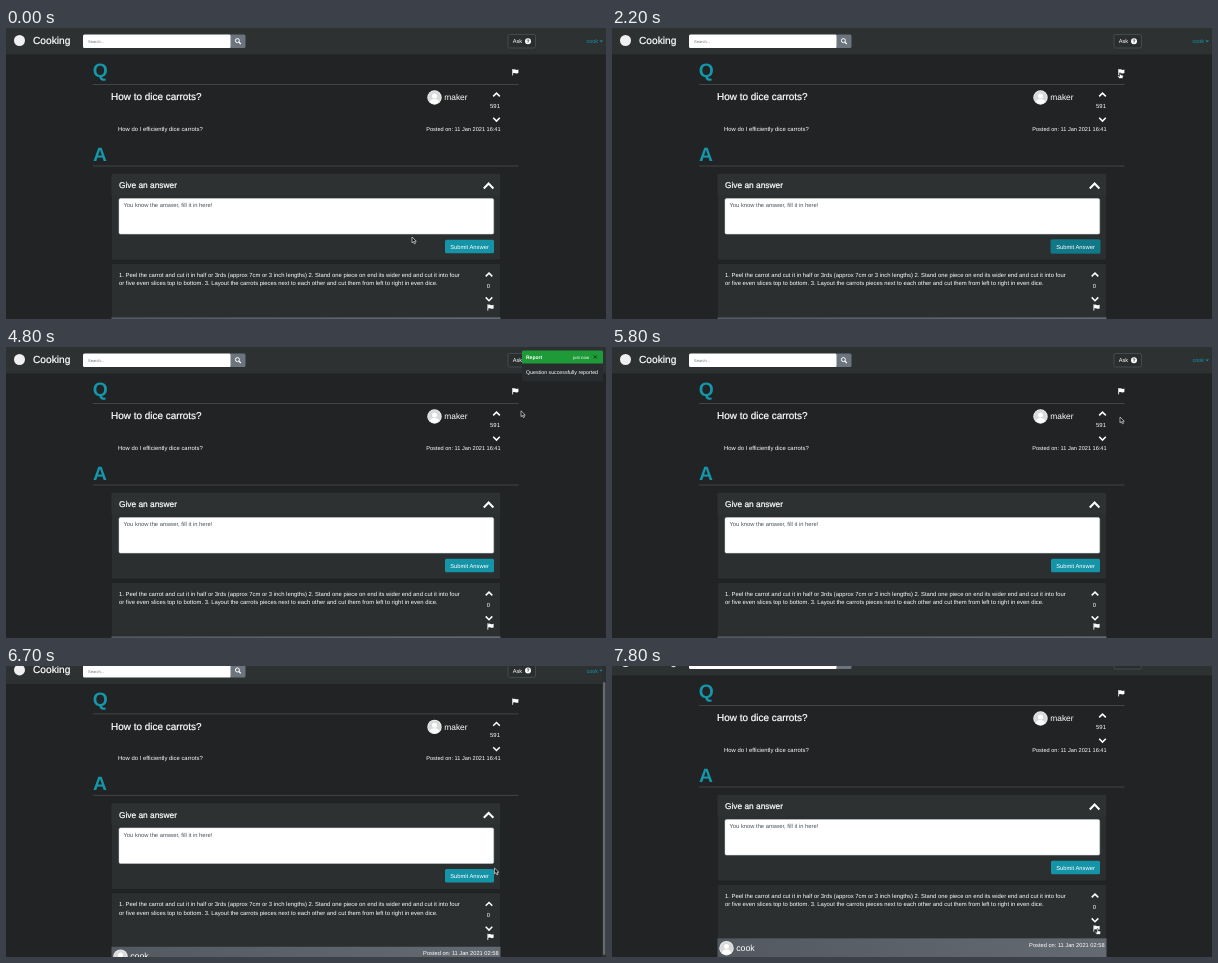
These frames come from a looping animation (600x291 px, 8000 ms). An HTML page:

```html
<!DOCTYPE html>
<html lang="en">
<head>
<meta charset="utf-8">
<title>Cooking</title>
<style>
html, body { margin: 0; width: 100%; height: 100%; overflow: hidden; background: #212324; }
svg { display: block; width: 100%; height: 100%; }
text { font-family: "Liberation Sans", Arial, sans-serif; fill: #fff; text-rendering: geometricPrecision; }
.medium { stroke: #fff; stroke-width: .22; }
.teal { fill: #1596a9; }
.hr { stroke: #4b4e4f; stroke-width: .8; }
.chevron { fill: none; stroke: #fff; stroke-width: 1.5; }
.card { fill: #2b2f30; stroke: #1d1f20; stroke-width: .5; }
</style>
</head>
<body>
<svg viewBox="0 0 600 291">
  <defs>
    <linearGradient id="barFill">
      <stop offset="0" stop-color="#535960"/>
      <stop offset="1" stop-color="#646a72"/>
    </linearGradient>
    <g id="flag">
      <path d="M.4 0V6.4" stroke="#fff" stroke-width=".8"/>
      <path d="M.7 .5Q2 0 3.3 .6T6.2 .5V4.1Q4.7 4.8 3.3 4.2T.7 4.3Z" fill="#fff"/>
    </g>
    <g id="avatar">
      <circle r="7.2" fill="#f4f4f4"/>
      <circle r="6.5" fill="#d9d9d9"/>
      <circle cy="-1.6" r="2.5" fill="#fff"/>
      <path d="M-4.6 4.6Q-4.2 1.4 0 1.4T4.6 4.6Q2.6 6.5 0 6.5T-4.6 4.6Z" fill="#fff"/>
    </g>
    <path id="up" class="chevron" d="M-3.3 1.8L0 -1.5L3.3 1.8"/>
    <path id="down" class="chevron" d="M-3.3 -1.8L0 1.5L3.3 -1.8"/>
  </defs>

  <g id="page">
    <rect y="-5" width="600" height="31.5" fill="#2d3132"/>
    <circle cx="13.5" cy="12.5" r="5.5" fill="#f0f0f0"/>
    <text class="medium" x="27" y="16" font-size="10.2">Cooking</text>
    <rect x="77" y="6.5" width="148" height="13.5" rx="1.5" fill="#fff"/>
    <text x="82" y="15.2" font-size="4" style="fill:#6c757d">Search...</text>
    <path d="M224.5 6.5H238Q239.5 6.5 239.5 8V18.5Q239.5 20 238 20H224.5Z" fill="#6c757d"/>
    <g fill="none" stroke="#fff" stroke-width="1">
      <circle cx="231.4" cy="12.6" r="2"/>
      <path d="M232.9 14.1L234.8 16" stroke-width="1.3"/>
    </g>
    <rect x="502" y="6.5" width="27.5" height="13.5" rx="1.5" fill="#2a2e2f" stroke="#50565a" stroke-width=".7"/>
    <text x="506.7" y="15.3" font-size="5.7">Ask</text>
    <circle cx="522" cy="13.2" r="3" fill="#fff"/>
    <text x="522" y="15.1" font-size="5" font-weight="bold" text-anchor="middle" style="fill:#2a2e2f">?</text>
    <text class="teal" x="580.5" y="15.3" font-size="5.5">cook</text>
    <path class="teal" d="M593.4 12.4H597L595.2 14.2Z"/>

    <text class="teal" x="86.8" y="48.7" font-size="19.3" font-weight="bold">Q</text>
    <use href="#flag" x="506.2" y="41"/>
    <path class="hr" d="M87 56.5H512.5M87 138H512.5"/>
    <text class="medium" x="105" y="72.2" font-size="9.95">How to dice carrots?</text>
    <use href="#avatar" x="428.5" y="69.5"/>
    <text x="438.3" y="72.3" font-size="8.4">maker</text>
    <use href="#up" x="490.5" y="66.6"/>
    <text x="489" y="80" font-size="5.9" text-anchor="middle">591</text>
    <use href="#down" x="490.5" y="91.6"/>
    <text x="112" y="102.8" font-size="5.9">How do I efficiently dice carrots?</text>
    <text x="494.6" y="102.8" font-size="5.62" text-anchor="end">Posted on: 11 Jan 2021 16:41</text>
    <text class="teal" x="87" y="132.8" font-size="19.3" font-weight="bold">A</text>

    <rect class="card" x="105.3" y="145.5" width="389.2" height="86.5"/>
    <rect x="105.5" y="145.8" width="388.8" height="21.7" fill="#2d3132"/>
    <text class="medium" x="113" y="160.3" font-size="8.35">Give an answer</text>
    <path class="chevron" d="M477.8 160.4L482.6 155.6L487.4 160.4" style="stroke-width:2.1"/>
    <rect x="113" y="170.5" width="374.7" height="35.6" rx="1.5" fill="#fff" stroke="#ced4da" stroke-width=".5"/>
    <text x="117.5" y="179.2" font-size="5.8" style="fill:#495057">You know the answer, fill it in here!</text>
    <rect id="ring" x="438.2" y="210.9" width="50.6" height="15.2" rx="2" fill="#1b5a65"/>
    <rect id="submit" x="439" y="211.7" width="49" height="13.5" rx="1.5"/>
    <text x="463.5" y="220.5" font-size="5.8" text-anchor="middle">Submit Answer</text>

    <rect class="card" x="105.3" y="235.5" width="389.2" height="54"/>
    <text x="113" y="248.8" font-size="5.86">1. Peel the carrot and cut it in half or 3rds (approx 7cm or 3 inch lengths) 2. Stand one piece on end its wider end and cut it into four</text>
    <text x="113" y="257.3" font-size="5.86">or five even slices top to bottom. 3. Layout the carrots pieces next to each other and cut them from left to right in even dice.</text>
    <use href="#up" x="483" y="246.6"/>
    <text x="482.4" y="260" font-size="5.9" text-anchor="middle">0</text>
    <use href="#down" x="483" y="271.2"/>
    <use href="#flag" x="481.4" y="276.3"/>
    <rect x="105.5" y="289.3" width="389" height="18.7" fill="url(#barFill)"/>
    <use href="#avatar" x="114.5" y="299.2"/>
    <text x="124.2" y="302" font-size="8.8">cook</text>
    <text x="492.6" y="297.8" font-size="5.7" text-anchor="end">Posted on: 11 Jan 2021 02:58</text>
  </g>

  <g id="scrollbar">
    <rect x="596" width="4" height="291" fill="#2b2e2f"/>
    <rect x="597" y="16" width="2.4" height="273" rx="1.2" fill="#66696a"/>
  </g>

  <g id="toast">
    <rect x="516" y="3.5" width="81" height="31" rx="1.5" fill="#292c2e"/>
    <path d="M516 16.5V5Q516 3.5 517.5 3.5H595.5Q597 3.5 597 5V16.5Z" fill="#1f9a38"/>
    <text x="520" y="11.8" font-size="5" font-weight="bold">Report</text>
    <text x="567" y="11.6" font-size="4.4">just now</text>
    <path d="M587.8 8.4L590.8 11.4M590.8 8.4L587.8 11.4" stroke="#10351a" stroke-width=".9"/>
    <text x="520" y="26.8" font-size="5.27">Question successfully reported</text>
  </g>

  <path id="arrow" d="M0 0V5.8L1.4 4.6L2.4 6.8L3.5 6.3L2.5 4.2H4.3Z" fill="#111" stroke="#fff" stroke-width=".6"/>
  <path id="hand" d="M-.6 .4Q0 -.4 .6 .4V2.2L2.8 2.7Q3.4 3 3.2 4L2.6 6H-.8L-2.4 3.7Q-2.2 2.9 -1.4 3.3L-.6 3.9Z" fill="#fff" stroke="#222" stroke-width=".6"/>
</svg>
<script>
const LOOP = 8000, STEP = 100;
const $ = id => document.getElementById(id);

// Keys are [time, ...values], joined by straight lines.
const cursor = [
  [0, 406, 209], [100, 406, 209], [200, 496.5, 72], [300, 496.5, 72], [800, 508, 44.5],
  [2800, 508, 44.5], [3400, 517, 66], [3900, 517, 66], [4100, 516.5, 65], [4400, 516.5, 65],
  [4800, 515, 63.8], [5400, 515, 63.8], [5800, 508, 70], [6200, 486, 148],
  [6600, 488.5, 202], [7100, 488.5, 202], [7600, 485.5, 262.5]
];
const scroll = [[6300, 0], [6400, 1], [6600, 5.5], [7000, 18], [7100, 18], [7400, 17]];
const toast = [[2300, 0], [2600, 1], [5400, 1], [5600, 0]];
const focus = [[900, 0], [1100, 1], [2400, 1], [2600, 0]];

function at(keys, t) {
  if (t <= keys[0][0]) return keys[0].slice(1);
  const i = keys.findIndex(k => k[0] > t);
  if (i < 0) return keys[keys.length - 1].slice(1);
  const a = keys[i - 1], b = keys[i], p = (t - a[0]) / (b[0] - a[0]);
  return a.slice(1).map((v, n) => v + (b[n + 1] - v) * p);
}

const mix = (a, b, p) => `rgb(${a.map((v, i) => Math.round(v + (b[i] - v) * p))})`;
const show = (el, on) => el.setAttribute("opacity", +on);

function draw(time) {
  const t = Math.floor(time % LOOP / STEP) * STEP;
  const [x, y] = at(cursor, t), [pressed] = at(focus, t);
  const pointing = t >= 700 && t < 2900 || t >= 7500;
  $("page").setAttribute("transform", `translate(0 ${-at(scroll, t)[0]})`);
  $("submit").setAttribute("fill", mix([21, 148, 168], [17, 120, 136], pressed));
  show($("ring"), pressed);
  show($("toast"), at(toast, t)[0]);
  show($("scrollbar"), t >= 6700 && t < 7400);
  show($("arrow"), !pointing);
  show($("hand"), pointing);
  for (const id of ["arrow", "hand"]) $(id).setAttribute("transform", `translate(${x} ${y})`);
}

const start = performance.now();
function tick() {
  draw(performance.now() - start);
  requestAnimationFrame(tick);
}
tick();
</script>
</body>
</html>
```
